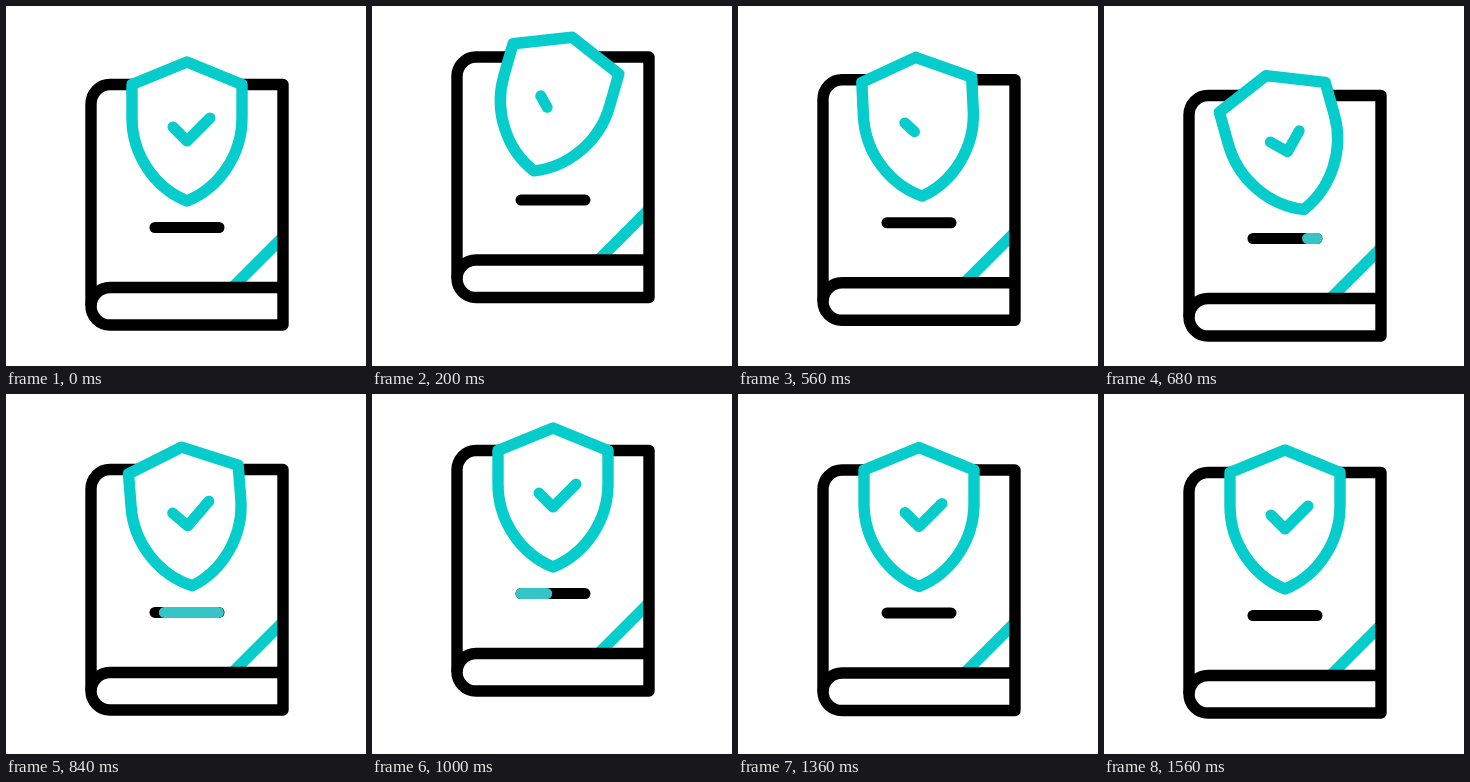
Write an HTML page that moves like this. It is 360 by 360 pixels and loops after 2000 ms.

```html
<!DOCTYPE html>
<html lang="en">
<head>
<meta charset="utf-8">
<title>Protected book</title>
<style>
  html, body { margin: 0; width: 100%; height: 100%; overflow: hidden; background: #fff; }
  svg { display: block; width: 100vw; height: 100vh; }
  path { fill: none; stroke: #000; stroke-width: 11.4; stroke-linejoin: round; }
  .round { stroke-linecap: round; stroke-width: 11; }
  .accent { stroke: #06cccc; }
  #shield { fill: #fff; }
  #sweep { stroke: #36c4c6; }
</style>
</head>
<body>
<svg viewBox="0 0 360 360">
  <g id="book">
    <path class="accent" stroke-width="10" d="M226 282L278 230"/>
    <path d="M277 319H104A19 19 0 0 1 85 300V98A19 19.5 0 0 1 104 78.5H277Z"/>
    <path d="M277 281.5H104A19 19 0 0 0 85 300"/>
    <path class="round" d="M149 221.5H213"/>
    <path class="round" id="sweep"/>
    <g id="badge">
      <path class="accent" id="shield" d="M181 56L236 78.5V112C236 149 213 182 181 195C149 182 126 149 126 112V78.5Z"/>
      <path class="round accent" id="check" d="M167 121L181 135L204 112" pathLength="100"/>
    </g>
  </g>
</svg>
<script>
const [book, badge, check, sweep] =
  ['book', 'badge', 'check', 'sweep'].map(id => document.getElementById(id));
const LOOP = 2000, STEP = 40;

// Eased curve through (0,0) and (1,1) with flat ends; a and b are the handle lengths.
const ease = (a, b) => x => {
  let lo = 0, hi = 1;
  for (let i = 0; i < 24; i++) {
    const s = (lo + hi) / 2, r = 1 - s;
    if (3 * r * r * s * a + 3 * r * s * s * b + s ** 3 < x) lo = s; else hi = s;
  }
  return lo * lo * (3 - 2 * lo);
};
const smooth = x => (1 - Math.cos(Math.PI * x)) / 2;
const drop = ease(0.8, 0.65);
const settle = ease(0.35, 0.2);

// Sum of eased moves: [start, end, change, easing].
const track = (from, ...moves) => t => moves.reduce((v, [a, b, change, fn = smooth]) =>
  v + change * (t <= a ? 0 : t >= b ? 1 : fn((t - a) / (b - a))), from);

const lift = track(0, [0, 220, -28], [270, 680, 39, drop], [680, 1040, -34], [1040, 1560, 23, settle]);
const tilt = track(0, [0, 220, 16.3], [270, 680, -32, drop], [680, 930, 15.7]);
const tick = track(100, [0, 300, -100], [460, 760, 100]);
const sweepLeft = track(213, [600, 920, -64]);
const sweepRight = track(213, [820, 1140, -64]);

function draw(now) {
  const t = Math.floor(now % LOOP / STEP) * STEP;
  book.setAttribute('transform', `translate(0 ${lift(t)})`);
  badge.setAttribute('transform', `rotate(${tilt(t)} 181 125.5)`);

  const shown = tick(t);
  check.style.visibility = shown > 0.5 ? 'visible' : 'hidden';
  check.setAttribute('stroke-dasharray', shown > 99.9 ? 'none' : `${shown} 300`);

  const left = sweepLeft(t), right = sweepRight(t);
  sweep.setAttribute('d', right - left > 0.3 ? `M${left} 221.5H${right}` : '');
  requestAnimationFrame(draw);
}
draw(0);
</script>
</body>
</html>
```
